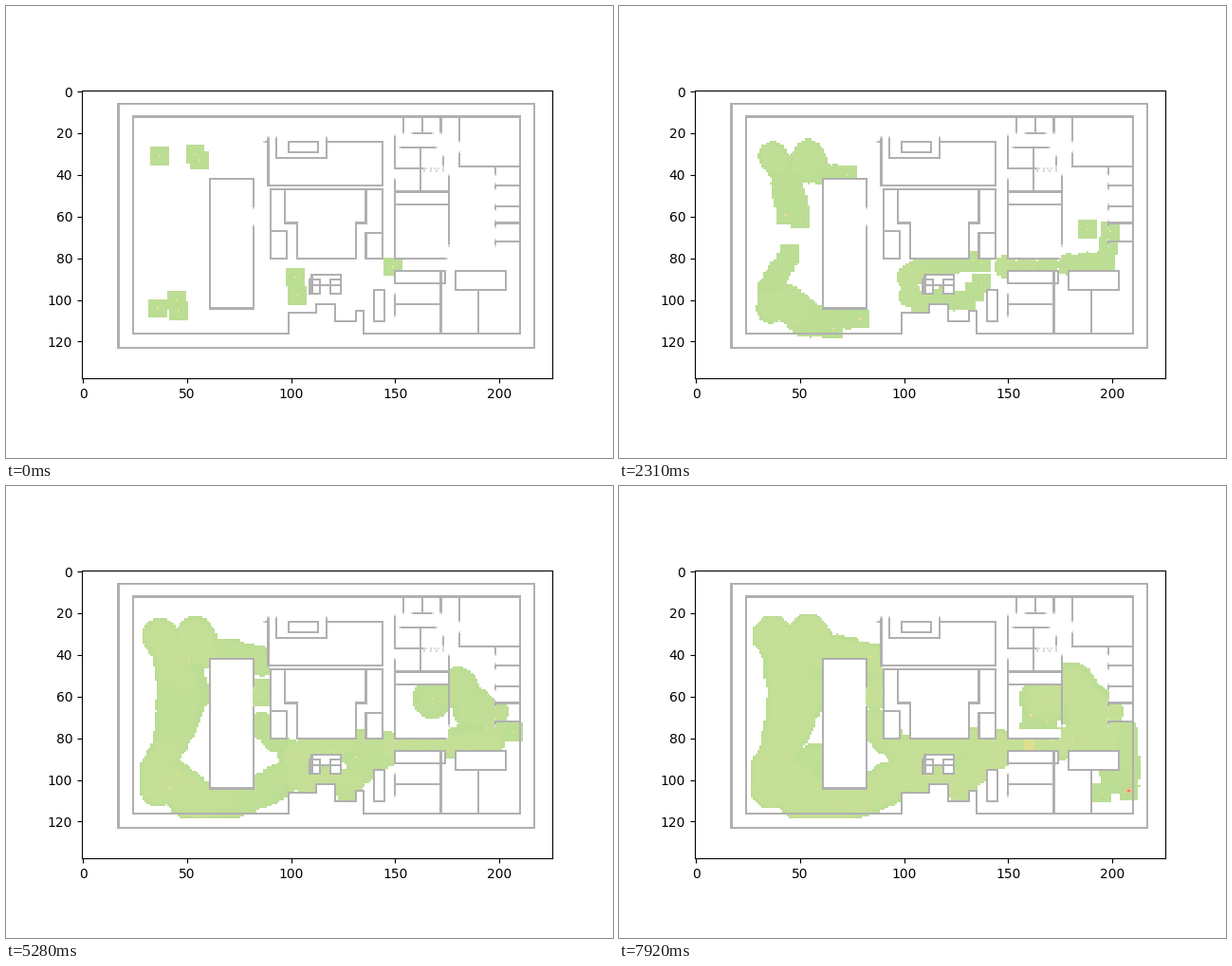
Write a matplotlib script that moves like this. It is 640 by 476 pixels and loops after 8 s.

```python
import numpy as np
import matplotlib.pyplot as plt
from matplotlib.animation import FuncAnimation

W, H = 226, 138
STEP_MS, TICK_MS, LOOP_MS = 330, 40, 8000
LAST = LOOP_MS // STEP_MS
REACH = 4  # half width of the square around a walker

WHITE, WALL, FAINT = (255, 255, 255), (176, 176, 176), (218, 218, 218)
FRESH, WORN = np.array([187, 221, 148]), np.array([197, 224, 150])
WARM, YELLOW, ORANGE, RED = (222, 222, 144), (236, 222, 140), (244, 190, 132), (238, 120, 104)

ROWS, COLS = np.mgrid[0:H, 0:W]
walls = np.zeros((H, W), bool)


def line(x0, y0, x1, y1):
    walls[min(y0, y1):max(y0, y1) + 1, min(x0, x1):max(x0, x1) + 1] = True


def trace(x, y, *turns):
    """Wall with right angles; turns give the next x, then y, then x, ..."""
    for i, value in enumerate(turns):
        nx, ny = (x, value) if i % 2 else (value, y)
        line(x, y, nx, ny)
        x, y = nx, ny


def box(x0, y0, x1, y1):
    trace(x0, y0, x1, y1, x0, y0)


def build_plan():
    box(17, 6, 217, 123)
    # shell with the entrance, west hall
    trace(99, 116, 24, 12, 210, 116, 135, 105, 131, 110, 121, 102, 112, 106, 99, 116)
    trace(82, 56, 82, 42, 61, 104, 82, 64)
    # upper and middle rooms
    trace(87, 24, 89)
    trace(89, 22, 89, 45, 144, 24, 117, 32, 93, 22)
    line(117, 22, 117, 24)
    box(99, 24, 113, 29)
    trace(90, 67, 98, 80, 90, 47, 144, 80, 136, 68, 144)
    trace(97, 47, 97, 63, 103, 80, 131, 63, 136, 47)
    # desk with two chairs, pillar
    trace(110, 97, 110, 88, 124, 97)
    line(110, 93, 124, 93)
    box(109, 90, 114, 97)
    box(119, 90, 124, 97)
    box(140, 95, 145, 110)
    # north-east rooms
    for x in (154, 163, 172):
        line(x, 12, x, 20)
    line(158, 20, 168, 20)
    trace(150, 21, 150, 37, 164)
    line(152, 27, 170, 27)
    line(162, 27, 162, 48)
    line(173, 31, 173, 36)
    for y in (48, 54):
        line(150, y, 176, y)
    trace(150, 42, 150, 80, 175)
    line(176, 40, 176, 74)
    line(181, 12, 181, 24)
    trace(181, 29, 181, 36, 210)
    line(198, 36, 198, 40)
    for y in (45, 55, 63, 72):
        line(198, y, 209, y)
        line(198, y - 1, 198, y + 2)
    # south-east rooms
    box(150, 86, 174, 92)
    trace(150, 97, 150, 102, 172, 86, 172, 116)
    line(150, 102, 150, 108)
    box(179, 86, 203, 95)
    line(190, 95, 190, 116)


def free_ends():
    p = np.pad(walls, 1).astype(int)
    near = p[:-2, 1:-1] + p[2:, 1:-1] + p[1:-1, :-2] + p[1:-1, 2:]
    return walls & (near == 1)


build_plan()
ENDS = free_ends()

# x0, y0, x1, y1 of rooms nobody enters
CLOSED = [(62, 42, 81, 104), (90, 13, 149, 46),
          (91, 47, 97, 80), (98, 47, 130, 63), (104, 63, 130, 80), (131, 47, 143, 67),
          (137, 68, 143, 80), (98, 63, 98, 80), (110, 88, 124, 93),
          (109, 90, 114, 97), (119, 90, 124, 97), (141, 95, 144, 110),
          (100, 107, 112, 118), (113, 103, 120, 118), (121, 111, 189, 118),
          (132, 106, 189, 118), (150, 13, 176, 53), (151, 76, 175, 79),
          (151, 87, 173, 115), (180, 87, 202, 94), (199, 13, 213, 62)]
floor = (COLS > 24) & (COLS < 214) & (ROWS > 12) & (ROWS < 119)
for x0, y0, x1, y1 in CLOSED:
    floor[y0:y1 + 1, x0:x1 + 1] = False

# each walker: (step, x, y) at the bends of its way
GARDEN = [
    [(0, 37, 31), (3, 42, 39), (7, 43, 59), (13, 39, 89), (16, 45, 98),
     (18, 57, 89), (21, 53, 106), (24, 68, 111)],
    [(0, 54, 30), (3, 45, 42), (7, 50, 61), (13, 41, 87), (16, 42, 104),
     (21, 67, 110), (24, 82, 112)],
    [(0, 56, 33), (3, 48, 38), (7, 73, 40), (9, 86, 43), (11, 86, 74), (13, 99, 86),
     (16, 119, 86), (21, 160, 83), (24, 169, 72)],
    [(0, 36, 104), (3, 36, 94), (7, 45, 78), (13, 56, 58), (16, 51, 43),
     (21, 68, 36), (24, 84, 41)],
    [(0, 46, 105), (3, 51, 111), (7, 66, 114), (13, 96, 103), (16, 106, 88),
     (21, 160, 83)],
    [(0, 45, 100), (3, 56, 108), (7, 79, 109), (13, 119, 82), (16, 131, 89),
     (21, 160, 84), (24, 161, 69)]]
HOUSE = [
    [(0, 102, 89), (3, 112, 82), (7, 133, 81), (13, 154, 83), (21, 169, 84), (24, 171, 81)],
    [(0, 103, 98), (1, 108, 101), (3, 118, 99), (5, 130, 100), (7, 137, 92),
     (13, 157, 84), (16, 184, 85), (24, 181, 81)],
    [(0, 102, 89), (3, 117, 83), (7, 137, 82), (9, 127, 105), (11, 141, 88), (13, 167, 82),
     (16, 194, 75), (18, 207, 90), (20, 199, 97), (21, 209, 93), (24, 195, 106)],
    [(0, 149, 84), (3, 179, 83), (5, 197, 81), (7, 199, 67), (10, 190, 68),
     (13, 177, 84), (16, 207, 77), (21, 208, 103), (24, 208, 105)]]
RESTING = [[(7, 188, 66), (8, 180, 56), (9, 168, 61)]]

# walker and how fast its trail widens
WALKERS = [(np.array(way), drift)
           for group, drift in ((GARDEN, 1.2), (HOUSE, .6), (RESTING, 2.2))
           for way in group]


def place(way, step):
    steps, xs, ys = way.T
    return round(np.interp(step, steps, xs)), round(np.interp(step, steps, ys))


def arrival_steps():
    """Each visit marks a square that widens with the root of its age."""
    arrive = np.full((H, W), np.inf)
    for way, drift in WALKERS:
        for step in range(way[0, 0], LAST + 1):
            x, y = place(way, step)
            dx, dy = abs(COLS - x), abs(ROWS - y)
            dist = np.where(np.maximum(dx, dy) <= REACH, REACH, np.hypot(dx, dy))
            arrive = np.minimum(arrive, step + ((dist - REACH) / drift) ** 2)
    arrive[~floor] = np.inf
    return arrive


ARRIVE = arrival_steps()


def picture(step):
    img = np.full((H, W, 3), WHITE, np.uint8)
    seen = ARRIVE <= step
    age = np.clip((step - ARRIVE[seen]) / 16, 0, 1)[:, None]
    img[seen] = FRESH + (WORN - FRESH) * np.round(age * 4) / 4

    def spot(x, y, color, r=0):
        img[seen & (abs(COLS - x) + abs(ROWS - y) <= r)] = color

    # meeting point in the corridor
    if step >= 20:
        r = 1 if step < 23 else 2
        img[seen & (abs(COLS - 160) <= r) & (abs(ROWS - 83) <= r)] = WARM
    for way, _ in WALKERS:
        if step >= way[0, 0]:
            spot(*place(way, step), YELLOW)
    # crowded corner
    if step >= 20:
        spot(208, 105, ORANGE, int(step >= 23))
    if step >= 23:
        spot(208, 105, RED)

    img[walls] = WALL
    img[ENDS] = FAINT
    img[37, 165:174:2] = FAINT
    img[38, 164:174:3] = FAINT
    return img


fig, ax = plt.subplots(figsize=(6.4, 4.76), dpi=100)
shown = ax.imshow(picture(0), interpolation="nearest")


def draw(i):
    shown.set_data(picture((i * TICK_MS + 30) // STEP_MS))
    return (shown,)


anim = FuncAnimation(fig, draw, frames=LOOP_MS // TICK_MS, interval=TICK_MS,
                     init_func=lambda: draw(0), repeat=True, repeat_delay=0)
plt.show()
```
